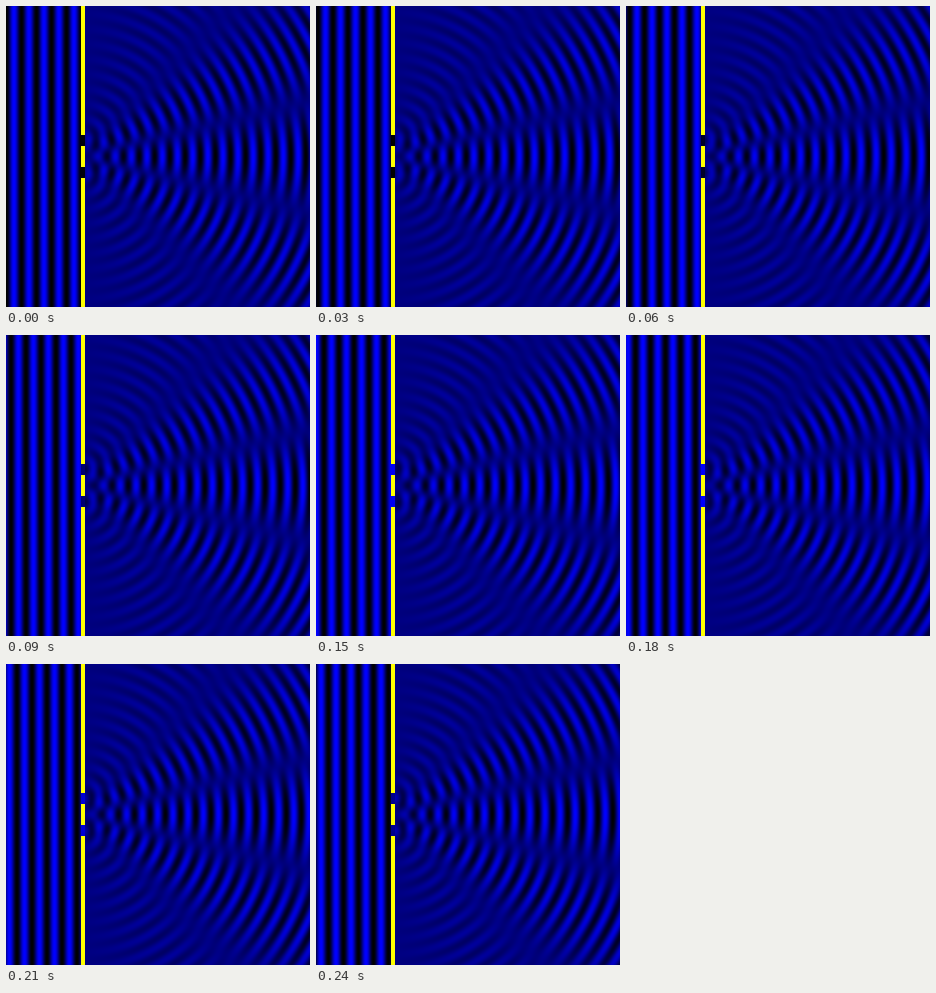
Write an HTML page with a canvas that moves like this. It is 304 px wide and 301 px high and loops after 300 ms.

```html
<!DOCTYPE html>
<html lang="en">
<head>
<meta charset="utf-8">
<title>Double slit</title>
<style>
  html, body { margin: 0; width: 100%; height: 100%; overflow: hidden; background: #000080; }
  canvas { display: block; width: 100%; height: 100%; }
</style>
</head>
<body>
<canvas width="304" height="301"></canvas>
<script>
const ctx = document.querySelector('canvas').getContext('2d');
const W = 304, H = 301;
const WAVELENGTH = 15, K = 2 * Math.PI / WAVELENGTH;
const WALL = 75, WALL_END = 79;
const SLIT_CENTERS = [134, 166], SLIT_HALF = 5;
const STEP_MS = 30, LOOP_MS = 300, LAST_STEP = 8;

const sources = SLIT_CENTERS.flatMap(center =>
  Array.from({ length: 2 * SLIT_HALF + 1 }, (_, i) => center - SLIT_HALF + i));

// Complex field (re, im) per pixel; each step only rotates its phase.
const re = new Float32Array(W * H), im = new Float32Array(W * H);
const isWall = new Uint8Array(W * H);

function setPlaneWave(i, x) {
  re[i] = Math.cos(K * x);
  im[i] = Math.sin(K * x);
}

// Huygens sum over the slit openings, weighted by obliquity.
function setDiffracted(i, x, y) {
  for (const sourceY of sources) {
    const dx = x - WALL;
    const r = Math.hypot(dx, y - sourceY);
    const weight = dx / r / sources.length;
    const phase = K * (WALL + r);
    re[i] += weight * Math.cos(phase);
    im[i] += weight * Math.sin(phase);
  }
}

for (let y = 0; y < H; y++) {
  const inSlit = sources.includes(y);
  for (let x = 0; x < W; x++) {
    const i = y * W + x;
    if (x < WALL) setPlaneWave(i, x);
    else if (x >= WALL_END) setDiffracted(i, x, y);
    else if (inSlit) setPlaneWave(i, WALL + 1);
    else isWall[i] = 1;
  }
}

const image = ctx.createImageData(W, H);
const pixels = new Uint32Array(image.data.buffer);
const YELLOW = 0xff00ffff;

function draw(step) {
  const phase = 2 * Math.PI * step * STEP_MS / LOOP_MS;
  const c = Math.cos(phase), s = Math.sin(phase);
  for (let i = 0; i < pixels.length; i++) {
    const wave = -(re[i] * c + im[i] * s);
    const blue = Math.round(127.5 * (1 + wave));
    pixels[i] = isWall[i] ? YELLOW : (0xff000000 | blue << 16) >>> 0;
  }
  ctx.putImageData(image, 0, 0);
}

let shown = -1;
function tick() {
  const step = Math.min(LAST_STEP, Math.floor(performance.now() % LOOP_MS / STEP_MS));
  if (step !== shown) draw(shown = step);
  requestAnimationFrame(tick);
}
tick();
</script>
</body>
</html>
```
